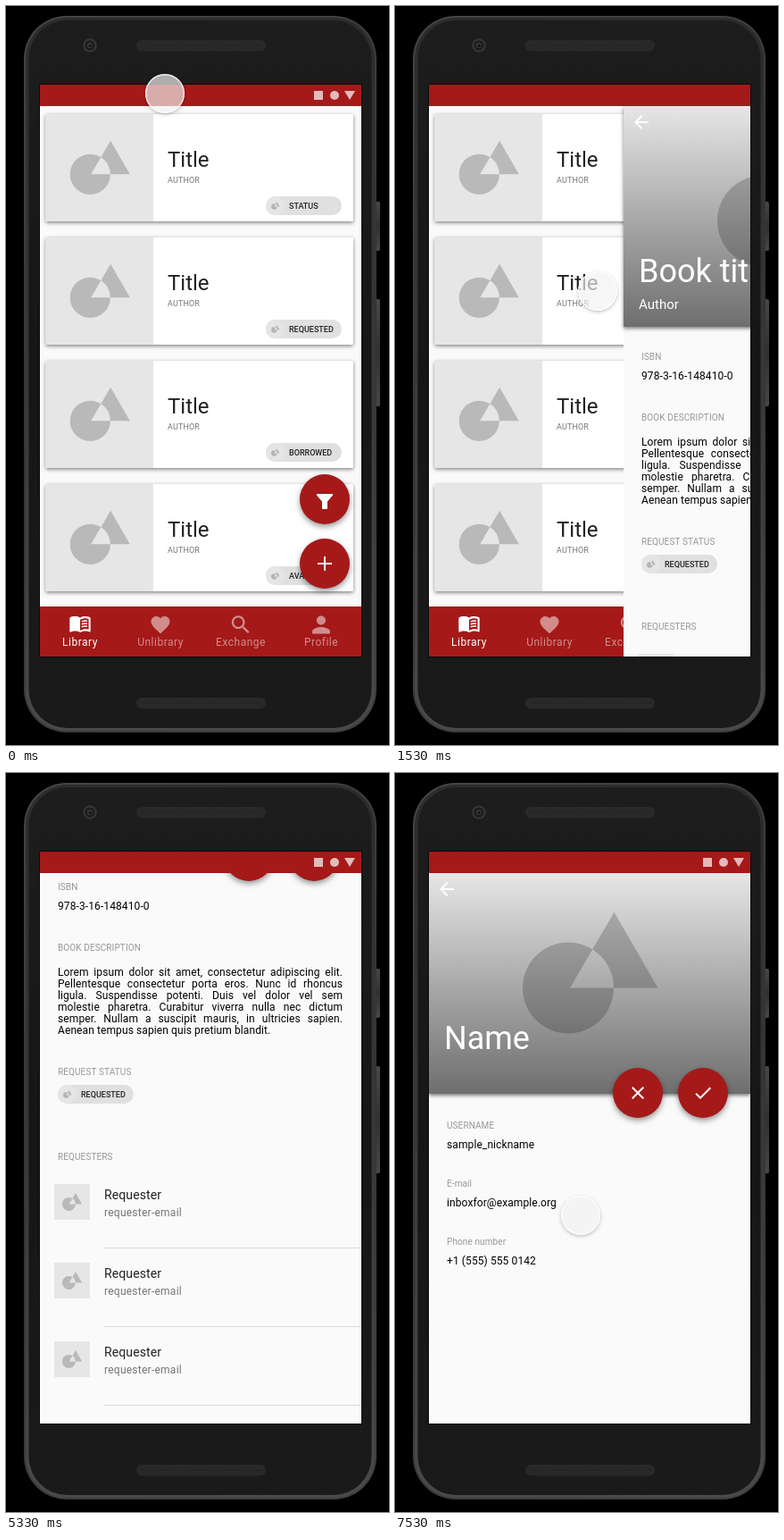
Recreate the animation shown at these times as an HTML page with a canvas. Size 429 by 827 pixels, loop 8 s.

```html
<!DOCTYPE html>
<html lang="en">
<head>
<meta charset="utf-8">
<title>Book library prototype</title>
<style>
html, body { margin: 0; height: 100%; overflow: hidden; background: #000; }
canvas { display: block; }
</style>
</head>
<body>
<canvas id="stage" width="429" height="827"></canvas>
<script>
const ctx = document.getElementById('stage').getContext('2d');
const LOOP = 8000, FRAME = 1000 / 15;
const RED = '#a51919', PAPER = '#fafafa', FADED = 'rgba(255,255,255,.5)';
const SCREEN = { x: 38, y: 88, w: 360, h: 640 };

const ICONS = {
  back: 'M20 11H7.83l5.59-5.59L12 4l-8 8 8 8 1.41-1.41L7.83 13H20z',
  book: 'M21 5c-1.11-.35-2.33-.5-3.5-.5-1.95 0-4.05.4-5.5 1.5-1.45-1.1-3.55-1.5-5.5-1.5S2.45 4.9 1 6v14.65c0 .25.25.5.5.5C3.1 20.45 5.05 20 6.5 20c1.95 0 4.05.4 5.5 1.5 1.35-.85 3.8-1.5 5.5-1.5 1.65 0 3.35.3 4.75 1.05.5.1.75-.2.75-.45V6c-.6-.45-1.25-.75-2-1zm0 13.5c-1.1-.35-2.3-.5-3.5-.5-1.7 0-4.15.65-5.5 1.5V8c1.35-.85 3.8-1.5 5.5-1.5 1.2 0 2.4.15 3.5.5zM13.5 9.3q3-1.2 6-.6v1.4q-3-.6-6 .6zm0 2.8q3-1.2 6-.6v1.4q-3-.6-6 .6zm0 2.8q3-1.2 6-.6v1.4q-3-.6-6 .6z',
  heart: 'M12 21.35l-1.45-1.32C5.4 15.36 2 12.28 2 8.5 2 5.42 4.42 3 7.5 3c1.74 0 3.41.81 4.5 2.09C13.09 3.81 14.76 3 16.5 3 19.58 3 22 5.42 22 8.5c0 3.78-3.4 6.86-8.55 11.54z',
  search: 'M15.5 14h-.79l-.28-.27C15.41 12.59 16 11.11 16 9.5 16 5.91 13.09 3 9.5 3S3 5.91 3 9.5 5.91 16 9.5 16c1.61 0 3.09-.59 4.23-1.57l.27.28v.79l5 4.99L20.49 19zm-6 0C7.01 14 5 11.99 5 9.5S7.01 5 9.5 5 14 7.01 14 9.5 11.99 14 9.5 14z',
  person: 'M12 12c2.21 0 4-1.79 4-4s-1.79-4-4-4-4 1.79-4 4 1.79 4 4 4zm0 2c-2.67 0-8 1.34-8 4v2h16v-2c0-2.66-5.33-4-8-4z',
  pencil: 'M3 17.25V21h3.75L17.81 9.94l-3.75-3.75zM20.71 7.04c.39-.39.39-1.02 0-1.41l-2.34-2.34c-.39-.39-1.02-.39-1.41 0l-1.83 1.83 3.75 3.75z',
  filter: 'M3.3 5.5H20.7Q21.5 6 21 7L15 14V21.5Q15 22.5 14 22.5H10Q9 22.5 9 21.5V14L3 7Q2.5 6 3.3 5.5z',
  plus: 'M20 13h-7v7h-2v-7H4v-2h7V4h2v7h7z',
  close: 'M19 6.41L17.59 5 12 10.59 6.41 5 5 6.41 10.59 12 5 17.59 6.41 19 12 13.41 17.59 19 19 17.59 13.41 12z',
  check: 'M9 16.17L4.83 12l-1.42 1.41L9 19 21 7l-1.41-1.41z'
};
for (const name in ICONS) ICONS[name] = new Path2D(ICONS[name]);

const DESCRIPTION = [
  'Lorem ipsum dolor sit amet, consectetur adipiscing elit.',
  'Pellentesque consectetur porta eros. Nunc id rhoncus',
  'ligula. Suspendisse potenti. Duis vel dolor vel sem',
  'molestie pharetra. Curabitur viverra nulla nec dictum',
  'semper. Nullam a suscipit mauris, in ultricies sapien.',
  'Aenean tempus sapien quis pretium blandit.'
];

function rect(x, y, w, h, fill) {
  ctx.fillStyle = fill;
  ctx.fillRect(x, y, w, h);
}

function round(x, y, w, h, r, fill) {
  ctx.beginPath();
  ctx.roundRect(x, y, w, h, r);
  ctx.fillStyle = fill;
  ctx.fill();
}

function disc(x, y, r, fill) {
  ctx.beginPath();
  ctx.arc(x, y, r, 0, Math.PI * 2);
  ctx.fillStyle = fill;
  ctx.fill();
}

function gradient(x0, y0, x1, y1, ...colors) {
  const g = ctx.createLinearGradient(x0, y0, x1, y1);
  colors.forEach((c, i) => g.addColorStop(i / (colors.length - 1), c));
  return g;
}

function shadowed(blur, dy, color, draw) {
  ctx.save();
  ctx.shadowBlur = blur;
  ctx.shadowOffsetY = dy;
  ctx.shadowColor = color;
  draw();
  ctx.restore();
}

function text(str, x, y, size, color, { weight = 400, gap = 0, align = 'left' } = {}) {
  ctx.font = `${weight} ${size}px Roboto, sans-serif`;
  ctx.letterSpacing = gap + 'px';
  ctx.textAlign = align;
  ctx.fillStyle = color;
  ctx.fillText(str, x, y);
}

const label = (str, y) => text(str, 58, y, 10, '#979797', { gap: 0.1 });
const value = (str, y) => text(str, 58, y, 12, '#000', { gap: 0.1 });

function justified(str, x, y, width) {
  value('', y);
  const words = str.split(' ');
  const widths = words.map(w => ctx.measureText(w).width);
  const space = (width - widths.reduce((a, b) => a + b)) / (words.length - 1);
  words.forEach((w, i) => {
    ctx.fillText(w, x, y);
    x += widths[i] + space;
  });
}

function icon(name, x, y, color = '#fff', scale = 1) {
  ctx.save();
  ctx.translate(x, y);
  ctx.scale(scale, scale);
  ctx.translate(-12, -12);
  ctx.fillStyle = color;
  ctx.fill(ICONS[name]);
  ctx.restore();
}

// Circle and triangle placeholder; their overlap stays open.
function placeholder(x, y, r, color = '#b9b9b9') {
  ctx.beginPath();
  ctx.arc(x, y, r, 0, Math.PI * 2);
  ctx.moveTo(x + r * 1.01, y - r * 1.66);
  ctx.lineTo(x + r * 0.04, y);
  ctx.lineTo(x + r * 1.97, y);
  ctx.closePath();
  ctx.fillStyle = color;
  ctx.fill('evenodd');
}

function chip(x, y, str) {
  round(x, y, 85, 21, 10.5, '#e0e0e0');
  disc(x + 10.5, y + 10.5, 10.5, '#e5e5e5');
  placeholder(x + 9.3, y + 11.5, 3.2, '#b4b4b4');
  text(str, x + 26, y + 13.5, 9, '#212121', { weight: 500 });
}

function fab(x, y, name) {
  shadowed(6, 3, 'rgba(0,0,0,.4)', () => disc(x, y, 28, RED));
  if (name) icon(name, x, y);
}

function statusBar() {
  rect(38, 88, 360, 24, RED);
  const tint = 'rgba(255,255,255,.7)';
  rect(345, 95, 10, 10, tint);
  disc(368, 100, 5, tint);
  ctx.beginPath();
  ctx.moveTo(379, 95);
  ctx.lineTo(391, 95);
  ctx.lineTo(385, 105);
  ctx.fill();
}

function library() {
  ['STATUS', 'REQUESTED', 'BORROWED', 'AVAILABLE'].forEach((state, i) => {
    const y = 121 + i * 138;
    shadowed(4, 1.5, 'rgba(0,0,0,.5)', () => round(44.5, y, 344.5, 120, 1.5, '#fff'));
    rect(44.5, y, 120.5, 120, '#e6e6e6');
    placeholder(94.3, y + 67.3, 22.6);
    text('Title', 181, y + 59, 24, '#212121');
    text('AUTHOR', 181, y + 77, 9, '#757575', { gap: 0.15 });
    chip(291, y + 92, state);
  });
  fab(357, 552);
  icon('filter', 357, 552.5);
  fab(357, 624, 'plus');
  rect(38, 672, 360, 56, RED);
  const tabs = [['book', 'Library', 1.06], ['heart', 'Unlibrary', 1.05],
                ['search', 'Exchange', 1.13], ['person', 'Profile', 1.25]];
  tabs.forEach(([name, str, scale], i) => {
    const x = 83 + i * 90, color = i ? FADED : '#fff';
    icon(name, x, i ? 692.5 : 691, color, scale);
    text(str, x, 716, 12, color, { gap: 0.5, align: 'center' });
  });
}

function hero(title) {
  shadowed(4, 2, 'rgba(0,0,0,.5)', () => rect(38, 112, 360, 247, '#e6e6e6'));
  placeholder(194, 240.5, 51);
  rect(38, 112, 360, 247, gradient(0, 112, 0, 359, 'rgba(0,0,0,0)', 'rgba(0,0,0,.52)'));
  icon('back', 58, 130);
  text(title, 55, 309, 36, '#fff');
}

function bookDetail() {
  hero('Book title');
  text('Author', 55, 339, 15, '#fff');
  fab(272, 358, 'pencil');
  fab(345, 358);
  label('ISBN', 395.5);
  value('978-3-16-148410-0', 418);
  label('BOOK DESCRIPTION', 463.5);
  DESCRIPTION.forEach((line, i) => {
    const y = 492 + i * 13;
    if (i < 5) justified(line, 58, y, 319);
    else value(line, y);
  });
  label('REQUEST STATUS', 602.5);
  chip(58, 614, 'REQUESTED');
  label('REQUESTERS', 697.5);
  for (let i = 0; i < 3; i++) {
    const y = 725 + i * 88;
    rect(54, y, 40, 40, '#e6e6e6');
    placeholder(70.4, y + 22.4, 7.5);
    text('Requester', 110, y + 17, 14, '#212121', { gap: 0.1 });
    text('requester-email', 110, y + 36, 12, '#757575', { gap: 0.25 });
    rect(110, y + 71, 288, 1, '#dadada');
  }
}

function profile() {
  hero('Name');
  fab(272, 358, 'close');
  fab(345, 358, 'check');
  label('USERNAME', 397.5);
  value('sample_nickname', 420);
  label('E-mail', 462.5);
  value('inboxfor@example.org', 485);
  label('Phone number', 527.5);
  value('+1 (555) 555 0142', 550);
}

function page(content, { dx = 0, dy = 0, scroll = 0 } = {}) {
  ctx.save();
  ctx.beginPath();
  ctx.rect(SCREEN.x, SCREEN.y, SCREEN.w, SCREEN.h);
  ctx.clip();
  ctx.translate(dx, dy);
  rect(SCREEN.x, SCREEN.y, SCREEN.w, SCREEN.h, PAPER);
  ctx.translate(0, -scroll);
  content();
  ctx.translate(0, scroll);
  statusBar();
  ctx.restore();
}

function phone() {
  rect(0, 0, 429, 827, '#000');
  for (const [y, h] of [[219, 55], [328, 120]])
    round(412, y, 7, h, 2, gradient(0, y, 0, y + h, '#484848', '#303030', '#484848'));
  round(20, 11, 395, 802, 48, gradient(20, 11, 415, 813, '#454545', '#333', '#404040'));
  round(22, 13, 391, 798, 46, gradient(0, 11, 0, 813, '#2c2c2c', '#383838', '#4a4a4a'));
  round(25.5, 16, 384, 792, 43, gradient(0, 16, 0, 808, '#1d1d1d', '#161616', '#1a1a1a'));
  for (const y of [38, 774]) {
    round(146, y, 145, 12.5, 6.2, '#292929');
    for (let x = 152; x < 287; x += 4) rect(x, y + 5.5, 2, 1.5, '#222');
  }
  disc(94, 44, 7.8, '#353535');
  disc(94, 44, 5.5, '#1b1b1b');
  disc(94, 44, 3.2, '#343434');
  disc(94.5, 44.5, 1.6, '#111');
  rect(37, 87, 362, 642, '#0c0c0c');
}

function cursorAt(n) {
  if (n < 24) {
    const p = Math.min(n / 6, 1), e = p * p * (3 - 2 * p);
    return [178 + 49 * e, 98 + 221 * e];
  }
  if (n < 60) return [227, 319];
  if (n < 68) return [125, 370];
  if (n < 75) return [132, 453];
  if (n < 80) {
    const k = Math.max(0, n - 77);
    return [101 - 3.5 * k, 90 - 40 * k];
  }
  if (n < 96) return null;
  if (n < 102) return [175, 405];
  if (n < 108) return [175, 472];
  return [208, 495];
}

function cursor(n) {
  const at = cursorAt(n);
  if (!at) return;
  const [x, y] = at;
  if (n === 21) {
    disc(x, y, 22, 'rgba(255,255,255,.5)');
    return;
  }
  // The shadow stays outside the translucent disc.
  ctx.save();
  ctx.beginPath();
  ctx.rect(x - 40, y - 40, 80, 80);
  ctx.arc(x, y, 22, 0, Math.PI * 2);
  ctx.clip('evenodd');
  shadowed(4, 1.5, 'rgba(0,0,0,.3)', () => disc(x, y, 21.5, '#fff'));
  ctx.restore();
  disc(x, y, 22, 'rgba(242,242,242,.68)');
  ctx.beginPath();
  ctx.arc(x, y, 21.3, 0, Math.PI * 2);
  ctx.lineWidth = 1.4;
  ctx.strokeStyle = 'rgba(255,255,255,.75)';
  ctx.stroke();
}

function draw(now) {
  const n = Math.floor((now % LOOP + 5) / FRAME) % 120;
  phone();
  if (n < 60) {
    page(library);
    const p = Math.min(Math.max(n - 21, 0), 3) / 4.6;
    const left = Math.round(360 - 251 * (p * p * (3 - 2 * p)) / 0.7138);
    if (n > 21) page(bookDetail, { dx: n >= 24 ? 109 : left });
  } else {
    page(bookDetail, { scroll: 265 });
    if (n >= 108) page(profile, { dy: n < 113 ? 335 : 0 });
  }
  cursor(n);
}

const start = performance.now();
function tick() {
  draw(performance.now() - start);
  requestAnimationFrame(tick);
}
tick();
</script>
</body>
</html>
```
